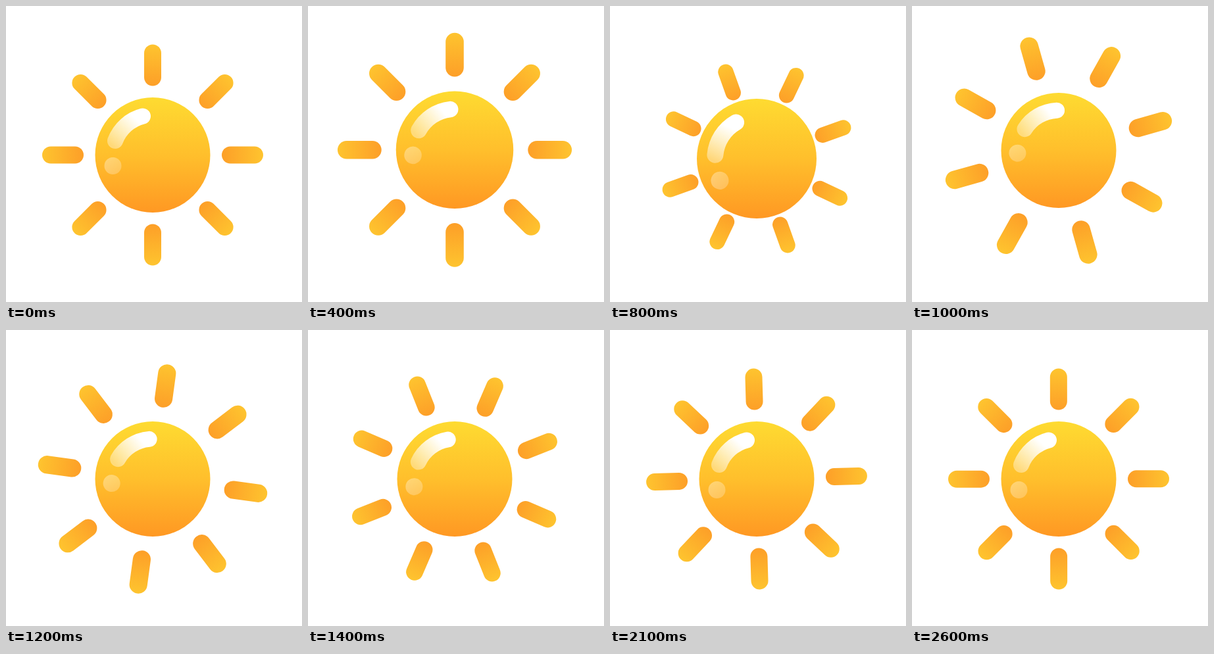
Recreate the animation shown at these times as an HTML page. Size 450 px wide and 450 px high, loop 2900 ms.

```html
<!DOCTYPE html>
<html lang="en">
<head>
<meta charset="utf-8">
<title>Sun</title>
<style>
  html, body { margin: 0; width: 100%; height: 100%; overflow: hidden; background: #fff; }
  svg { display: block; width: 100vw; height: 100vh; }
</style>
</head>
<body>
<svg viewBox="0 0 450 450">
  <defs>
    <linearGradient id="disc" x1="0" y1="0" x2="0" y2="1">
      <stop offset="0" stop-color="#fedb31"/>
      <stop offset=".5" stop-color="#ffbf2c"/>
      <stop offset="1" stop-color="#ff9823"/>
    </linearGradient>
    <linearGradient id="beam" x1="0" y1="0" x2="0" y2="1">
      <stop offset="0" stop-color="#fec42f"/>
      <stop offset="1" stop-color="#fd9f28"/>
    </linearGradient>
    <linearGradient id="shine" gradientUnits="userSpaceOnUse" x1="-14" y1="-62" x2="-60" y2="-13">
      <stop offset=".2" stop-color="#fff"/>
      <stop offset="1" stop-color="#fff" stop-opacity=".37"/>
    </linearGradient>
    <linearGradient id="spot" x1="0" y1="0" x2="1" y2="1">
      <stop offset="0" stop-color="#fff" stop-opacity=".36"/>
      <stop offset="1" stop-color="#fff" stop-opacity=".22"/>
    </linearGradient>
    <rect id="ray" x="-13" y="-168" width="26" height="63" rx="13" fill="url(#beam)"/>
  </defs>
  <g id="rays"></g>
  <g id="sun">
    <circle r="87.5" fill="url(#disc)"/>
    <g id="gloss">
      <path d="M-57-21.5A61 61 0 0 1-15-59" fill="none" stroke="url(#shine)" stroke-width="24" stroke-linecap="round"/>
      <circle cx="-60.5" cy="16.5" r="13" fill="url(#spot)"/>
    </g>
  </g>
</svg>
<script>
  const LOOP = 2900, STEP = 100, LAST = 26;
  const [rays, sun, gloss] = ["rays", "sun", "gloss"].map(id => document.getElementById(id));

  for (let a = 0; a < 360; a += 45)
    rays.innerHTML += `<use href="#ray" transform="rotate(${a})"/>`;

  const clamp = x => Math.min(Math.max(x, 0), 1);
  const smooth = x => x * x * (3 - 2 * x);
  const part = (t, from, to) => clamp((t - from) / (to - from));

  // Eases from a rest value through each [end time, value] in turn
  function swing(t, rest, ...moves) {
    let from = 0, v = rest;
    for (const [to, goal] of moves) {
      v += (goal - v) * smooth(part(t, from, to));
      from = to;
    }
    return v;
  }

  // Half a turn: quick start, long slow finish
  const spin = t => 180 * (1 - (1 - part(t, 480, 3145)) ** 5) * smooth(part(t, 480, 915));

  function draw(now) {
    const t = Math.min(Math.floor(now % LOOP / STEP), LAST) * STEP;
    const y = swing(t, 226.5, [450, 218.5], [800, 232], [970, 219], [1150, 226.5]);
    const size = swing(t, 1, [400, 1.02], [800, 1.04], [1000, 1]);
    const spread = swing(t, 1, [400, 1.06], [800, .902], [1050, 1.08], [1400, .993], [1800, 1]);
    const tilt = swing(t, 0, [400, 8], [800, -15.5], [1000, 11.5], [1700, 0]);
    const at = `translate(223 ${y})`;
    rays.setAttribute("transform", `${at} rotate(${spin(t)}) scale(${spread})`);
    sun.setAttribute("transform", `${at} scale(${size})`);
    gloss.setAttribute("transform", `rotate(${tilt})`);
  }

  const start = performance.now();
  function tick() {
    draw(performance.now() - start);
    requestAnimationFrame(tick);
  }
  tick();
</script>
</body>
</html>
```
